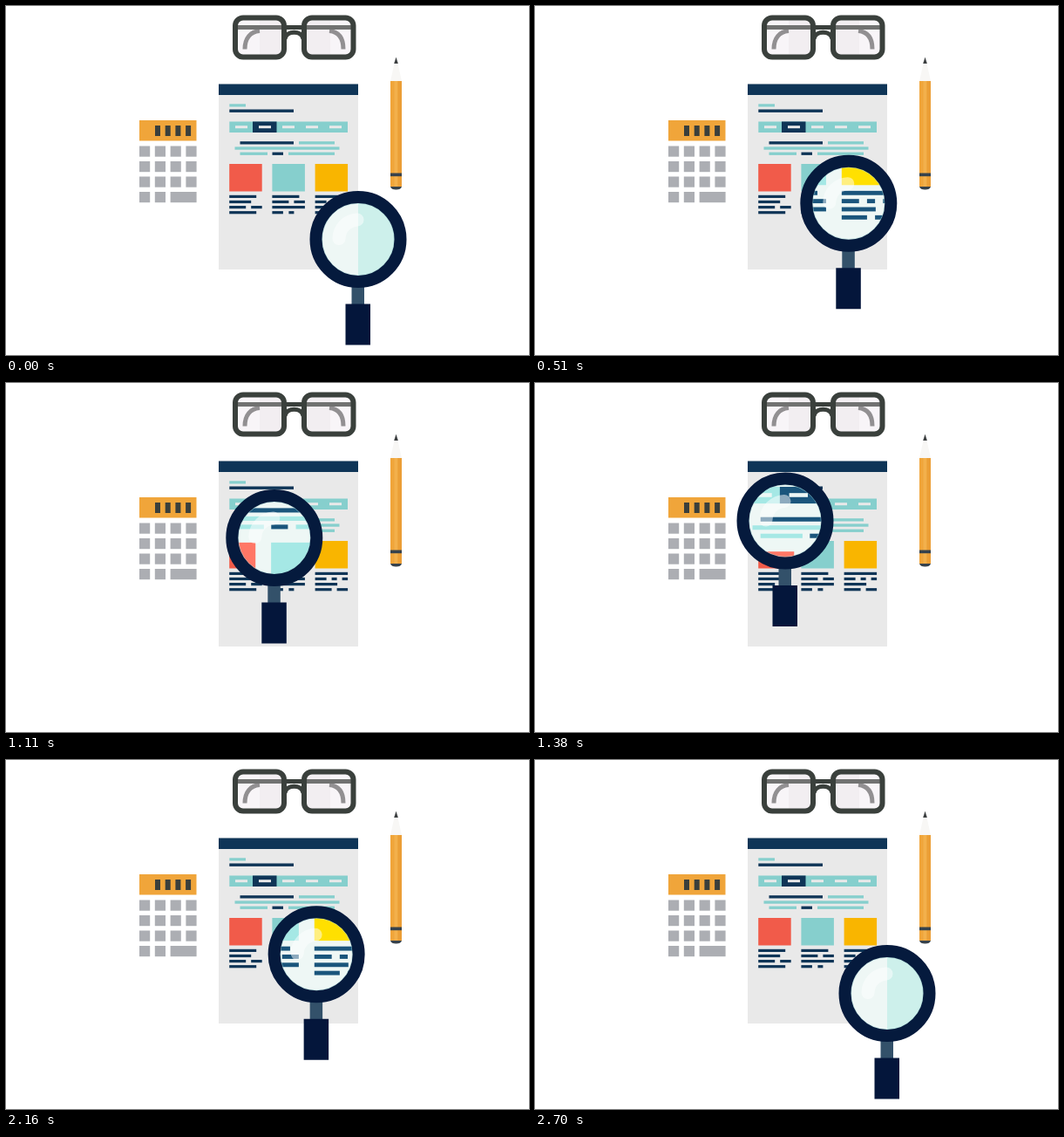
An HTML page for the animation above (2.73 s loop, 600 by 400 pixels).

```html
<!DOCTYPE html>
<html lang="en">
<head>
<meta charset="utf-8">
<title>Page under a magnifying glass</title>
<style>
html, body { margin: 0; width: 100%; height: 100%; overflow: hidden; background: #fff; }
svg { display: block; width: 600px; height: 400px; }
</style>
</head>
<body>
<svg viewBox="0 0 600 400" xmlns="http://www.w3.org/2000/svg">
  <defs>
    <clipPath id="disc"><circle r="42"/></clipPath>
    <filter id="soft" x="-10%" y="-10%" width="120%" height="120%"><feGaussianBlur stdDeviation="0.6"/></filter>
  </defs>

  <g id="glasses" fill="none">
    <rect x="263" y="13.5" width="56" height="45" rx="9" fill="#f8f5f8"/>
    <rect x="342" y="13.5" width="56.500" height="45" rx="9" fill="#f8f5f8"/>
    <path d="M291 15H316V57H291ZM345 15H372V57H345Z" fill="#f2eef1"/>
    <path d="M274 49.500C274 36 281 29.500 291 28.500M387 49.500C387 36 381 29.500 371 28.500" stroke="#929092" stroke-width="5"/>
    <path d="M265 24.500H318M343 24.500H397" stroke="#717271" stroke-width="5"/>
    <path d="M320 24.500H341" stroke="#3a403c" stroke-width="5"/>
    <path d="M320 38C321 27.500 340 27.500 341 38" stroke="#3a403c" stroke-width="5"/>
    <g stroke="#3a403c" stroke-width="6">
      <rect x="263" y="13.500" width="56" height="45" rx="9"/>
      <rect x="342" y="13.500" width="56.500" height="45" rx="9"/>
    </g>
  </g>

  <g id="pencil">
    <path d="M445.500 66H449.500L454 86H441Z" fill="#f8f7f5"/>
    <path d="M447.500 58.500L449.800 66H445.200Z" fill="#3c3f40"/>
    <path d="M441 86H454V207H441Z" fill="#f0a53a"/>
    <path d="M445.500 86H449.500V207H445.500Z" fill="#f3b04c"/>
    <path d="M449.500 86H454V207H449.500Z" fill="#eb9e36"/>
    <path d="M441 191.500H454V195.200H441Z" fill="#37424c"/>
    <path d="M441 207H454Q453 210.500 447.500 210.500Q442 210.500 441 207Z" fill="#37424c"/>
  </g>

  <g id="calc"></g>
  <g id="page"></g>

  <g id="glass">
    <path d="M-7.500 52H7V75H-7.500Z" fill="#33516a"/>
    <path d="M-14.500 74H14V121H-14.500Z" fill="#04163b"/>
    <g clip-path="url(#disc)">
      <circle r="43" fill="#cdf0eb"/>
      <g filter="url(#soft)"><g id="zoom"></g></g>
      <path d="M-22 -1A22 22 0 0 1 -1 -22.500" fill="none" stroke="#fff" stroke-opacity=".5" stroke-width="15" stroke-linecap="round"/>
    </g>
    <circle r="41.300" fill="none" stroke="#a4d6d4" stroke-opacity=".6"/>
    <circle r="48.500" fill="none" stroke="#051a3d" stroke-width="14"/>
  </g>
</svg>
<script>
const el = id => document.getElementById(id);
const bar = (x1, x2, y, h, fill) =>
  `<rect x="${x1}" y="${y}" width="${x2 - x1}" height="${h}" fill="${fill}"/>`;

function drawCalc() {
  let s = bar(153, 218.5, 131, 23.5, '#f0a53a');
  for (let c = 0; c < 4; c++) {
    s += bar(171 + c * 11.7, 177 + c * 11.7, 137, 12, '#3a3f3c');
    for (let r = 0; r < 4; r++) {
      if (r === 3 && c === 3) continue;
      const x = 153 + c * 17.8, wide = r === 3 && c === 2;
      s += bar(x, x + (wide ? 30 : 12.2), 160.5 + r * 17.5, 12.2, '#acaeb3');
    }
  }
  return s;
}

function drawPage({ paper, navy, teal, red, gold }) {
  let s = bar(244, 404, 89.5, 212.5, paper) + bar(244, 404, 89.5, 12.5, navy);
  s += bar(256.3, 275, 112.3, 3.2, teal) + bar(256.3, 330, 118.5, 3.4, navy);
  s += bar(256.3, 392, 132.5, 12.5, teal) + bar(283, 310.5, 132.5, 12.5, navy);
  for (let i = 0; i < 5; i++) s += bar(263 + i * 27, 277 + i * 27, 137.2, 3, paper);
  s += bar(268.5, 330, 155.2, 3.3, navy) + bar(336, 377, 155.2, 3.3, teal);
  s += bar(262.5, 382.5, 161.4, 3.3, teal);
  s += bar(268.5, 300, 167.6, 3.3, teal) + bar(305.5, 318, 167.6, 3.3, navy) + bar(324, 377, 167.6, 3.3, teal);
  // each text row: pairs of start and end offsets
  const cols = [
    [red, [[0, 31], [0, 25], [0, 19, 25, 37.5], [0, 31]]],
    [teal, [[0, 31], [0, 19, 25, 37.5], [0, 37.5], [0, 12.5, 19, 25]]],
    [gold, [[0, 37.5], [0, 13, 19, 25, 31, 37.5], [0, 25.5], [0, 19, 25, 37.5]]]
  ];
  cols.forEach(([fill, rows], i) => {
    const x = 256.2 + i * 49.2;
    s += bar(x, x + 37.5, 181, 31.5, fill);
    rows.forEach((row, r) => {
      for (let k = 0; k < row.length; k += 2)
        s += bar(x + row[k], x + row[k + 1], 216.8 + r * 6.1, 3.2, navy);
    });
  });
  return s;
}

el('calc').innerHTML = drawCalc();
el('page').innerHTML = drawPage({ paper: '#e9e9e9', navy: '#0f3557', teal: '#86cfcd', red: '#f15b4a', gold: '#f9b500' });
el('zoom').innerHTML = drawPage({ paper: '#eef7f5', navy: '#1a557c', teal: '#a5e8e5', red: '#ff7766', gold: '#ffe000' });

const STEP = 30, COUNT = 91, ZOOM = 1.53;

// out over 45 steps, one step of rest, back over 44
function travel(n) {
  if (n <= 45) return n / 45;
  return n <= 46 ? 1 : (90 - n) / 44;
}

function render(ms) {
  const k = travel(Math.floor(ms / STEP) % COUNT);
  const x = 404 - 117 * k, y = 267.5 - 109.5 * k;
  el('glass').setAttribute('transform', `translate(${x} ${y})`);
  el('zoom').setAttribute('transform', `scale(${ZOOM}) translate(${-x} ${-y})`);
}

let start;
function tick(now) {
  if (start === undefined) start = now;
  render(Math.max(0, now - start));
  requestAnimationFrame(tick);
}
render(0);
requestAnimationFrame(tick);
</script>
</body>
</html>
```
